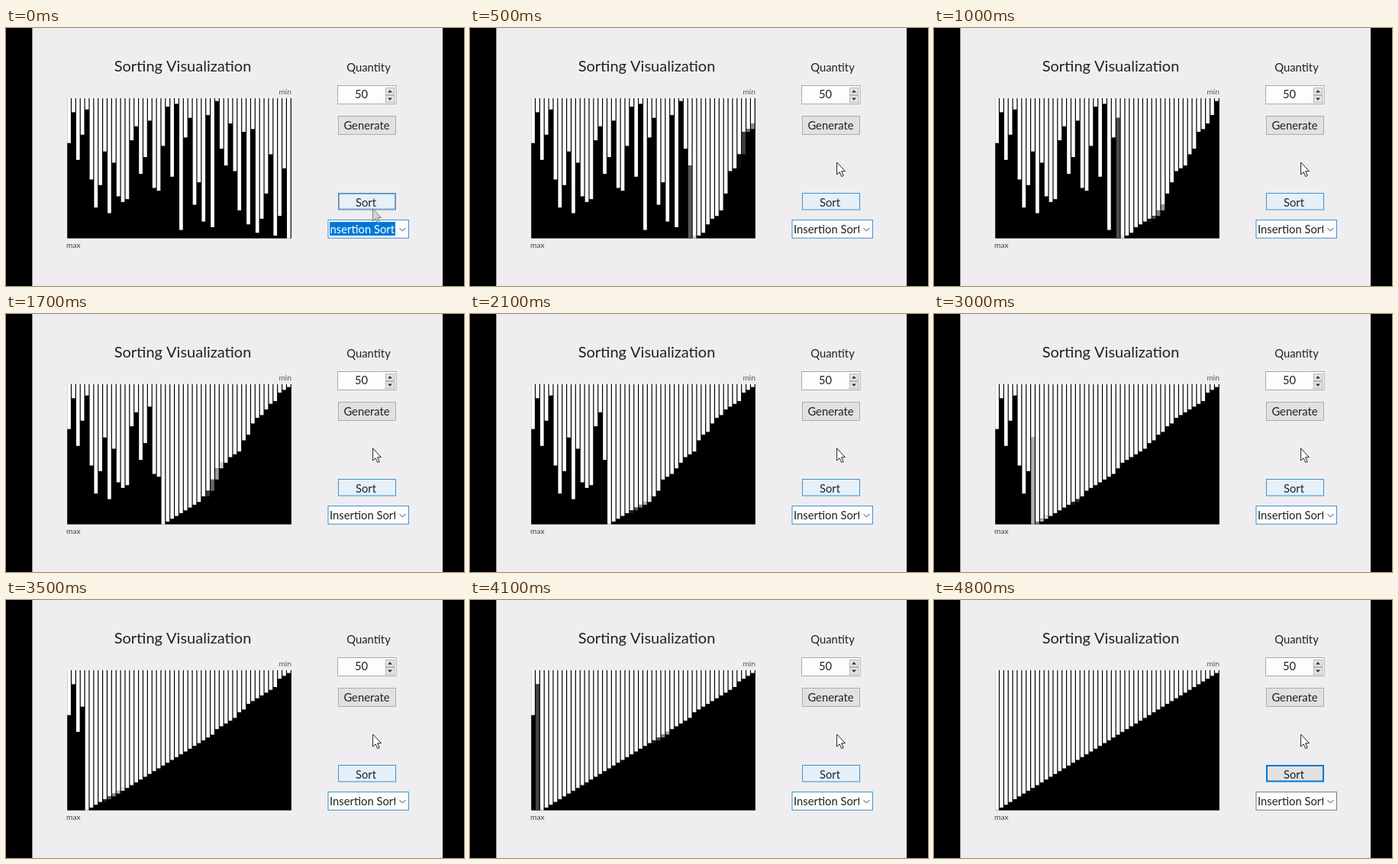
An HTML page with a canvas for the animation above (4.9 s loop, 600 px wide and 338 px high).

```html
<!DOCTYPE html>
<html lang="en">
<head>
<meta charset="utf-8">
<title>Sorting Visualization</title>
<style>
html, body { margin: 0; width: 100%; height: 100%; overflow: hidden; background: #000; }
canvas { display: block; width: 600px; height: 338px; }
</style>
</head>
<body>
<canvas id="stage" width="600" height="338"></canvas>
<script>
const ctx = document.getElementById('stage').getContext('2d');
const LOOP = 4900, TICK = 100;
const SPEED = 0.1635, DELAY = 18;   // shifts per ms, shifts before the sort begins
const BLUR = 5;                     // shifts blended into one picture
const CHART = { x: 80.2, y: 92, w: 293.7, h: 183.6, gap: 1.2 };
const BLUE = '#0078d7', HOVER = '#3a92d4', INK = '#222', TEXT = 14.8;

const start = [16, 5, 22, 13, 4, 29, 39, 31, 19, 41, 23, 35, 37, 36, 15, 10, 27,
  21, 8, 32, 33, 17, 3, 28, 2, 47, 14, 7, 38, 30, 44, 6, 46, 1, 18, 24, 9, 26,
  40, 12, 45, 11, 48, 43, 34, 20, 49, 42, 25, 50];

// Insertion sort from the right; each bar keeps its history of values.
function record(values) {
  const a = values.slice();
  const log = a.map(v => [{ at: -Infinity, v }]);
  let step = 0;
  const put = (i, v, at) => { a[i] = v; log[i].push({ at, v }); };
  for (let i = a.length - 2; i >= 0; i--) {
    const key = a[i];
    let j = i;
    while (j + 1 < a.length && a[j + 1] > key) {
      put(j, a[j + 1], ++step);
      j++;
    }
    if (j > i) put(j, key, step + 0.5);
  }
  return log;
}
const history = record(start);

function box(x, y, w, h, fill, edge, line = 1) {
  ctx.fillStyle = edge;
  ctx.fillRect(x, y, w, h);
  ctx.fillStyle = fill;
  ctx.fillRect(x + line, y + line, w - 2 * line, h - 2 * line);
}

function label(text, x, y, size = TEXT, align = 'center', color = INK) {
  ctx.font = size + 'px Lato, Carlito, sans-serif';
  ctx.textAlign = align;
  ctx.fillStyle = color;
  ctx.fillText(text, x, y);
}

// Values one bar held during the blended span, shortest first.
function recent(log, now) {
  const parts = [];
  let end = now;
  for (let k = log.length - 1; k >= 0 && end > now - BLUR; k--) {
    const from = Math.max(log[k].at, now - BLUR);
    if (from >= end) continue;
    parts.push({ v: log[k].v, share: (end - from) / BLUR });
    end = from;
  }
  return parts.sort((p, q) => p.v - q.v);
}

function drawBars(now) {
  const { x, y, w, h, gap } = CHART;
  const pitch = w / start.length, unit = h / start.length;
  ctx.fillStyle = '#000';
  ctx.fillRect(x, y, w, h);
  history.forEach((log, i) => {
    let light = 1, top = 0;
    for (const { v, share } of recent(log, now)) {
      const g = Math.round(253 * light);
      ctx.fillStyle = `rgb(${g},${g},${g})`;
      ctx.fillRect(x + i * pitch, y + top * unit, pitch - gap, (v - top) * unit);
      light -= share;
      top = v;
    }
  });
}

function triangle(x, y, dir) {
  ctx.fillStyle = '#333';
  ctx.beginPath();
  ctx.moveTo(x - 3, y + 1.5 * dir);
  ctx.lineTo(x + 3, y + 1.5 * dir);
  ctx.lineTo(x, y - 2 * dir);
  ctx.fill();
}

function drawSpinner() {
  box(434, 75, 77.5, 25, '#fdfdfd', '#a8a8aa');
  label('50', 465.5, 92);
  for (const [y, dir] of [[78, 1], [88, -1]]) {
    box(497, y, 12, 10, '#e6e6e6', '#b4b4b4');
    triangle(503, y + 5, dir);
  }
}

function drawSort(idle, done) {
  if (done) box(435, 216, 76, 22.5, '#e1e1e1', BLUE, 2);
  else box(435, 216, 76, 22.5, '#e5f0f9', HOVER);
  if (idle) {
    ctx.strokeStyle = '#555';
    ctx.lineWidth = 1;
    ctx.setLineDash([1, 1]);
    ctx.strokeRect(436.5, 217.5, 73, 19.5);
    ctx.setLineDash([]);
  }
  label('Sort', 471.5, 234);
}

function drawCombo(idle, done) {
  box(421.5, 251, 106.5, 24.7, '#fdfdfd', done ? '#7a7a7a' : HOVER);
  ctx.save();
  ctx.beginPath();
  ctx.rect(424, 253, 86, 21);
  ctx.clip();
  if (idle) {
    ctx.fillStyle = BLUE;
    ctx.fillRect(424, 254, 86, 18);
    label('Insertion Sort', 509, 269, TEXT, 'right', '#fff');
  } else {
    label('Insertion Sort', 424, 269, TEXT, 'left');
  }
  ctx.restore();
  ctx.strokeStyle = '#444';
  ctx.lineWidth = 1;
  ctx.beginPath();
  ctx.moveTo(515.5, 262);
  ctx.lineTo(519.5, 266);
  ctx.lineTo(523.5, 262);
  ctx.stroke();
}

function drawCursor(t) {
  const k = Math.min(1, t / 300), ease = 1 - (1 - k) ** 2;
  const shape = [[0, 0], [0, 16], [3.6, 12.8], [6.2, 18.6], [8.6, 17.5], [6, 11.8], [10.8, 11.5]];
  ctx.save();
  ctx.translate(480.6, 237 - 61 * ease);
  ctx.beginPath();
  shape.forEach(([x, y]) => ctx.lineTo(x, y));
  ctx.closePath();
  ctx.fillStyle = k ? '#fff' : '#d5d5d8';
  ctx.strokeStyle = k ? '#222' : '#777';
  ctx.lineWidth = 1;
  ctx.fill();
  ctx.stroke();
  ctx.restore();
}

function draw(t) {
  const idle = t < TICK, done = t >= 4600;
  ctx.fillStyle = '#000';
  ctx.fillRect(0, 0, 600, 338);
  ctx.fillStyle = '#efedf0';
  ctx.fillRect(34.4, 0, 537.6, 338);
  label('Sorting Visualization', 231.5, 57, 20);
  label('Quantity', 475, 57);
  label('min', 374, 87, 10.2, 'right', '#555');
  label('max', 79, 288, 10.2, 'left', '#444');
  drawBars(t * SPEED - DELAY);
  drawSpinner();
  box(435, 115, 76, 25, '#e1e1e1', '#adadad');
  label('Generate', 472.5, 133);
  drawSort(idle, done);
  drawCombo(idle, done);
  drawCursor(t);
}

const origin = performance.now();
function frame() {
  const t = (performance.now() - origin) % LOOP;
  draw(Math.floor(t / TICK) * TICK);
  requestAnimationFrame(frame);
}
frame();
</script>
</body>
</html>
```
